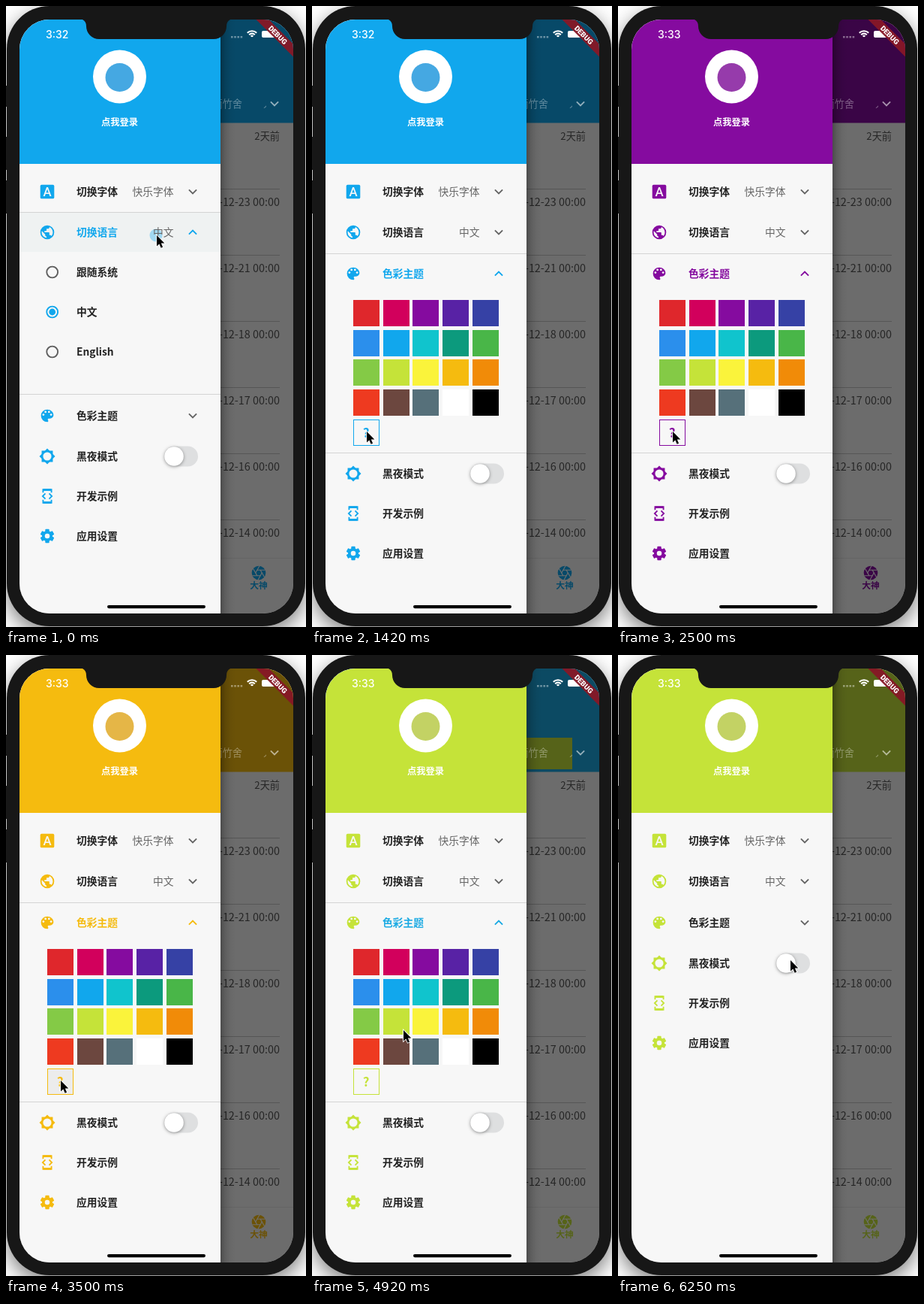
These frames come from a looping animation (400 by 826 pixels, 6.33 s). An HTML page with a canvas:

```html
<!DOCTYPE html>
<html lang="zh">
<head>
<meta charset="utf-8">
<style>
html, body { margin: 0; width: 100%; height: 100%; overflow: hidden; background: #fff; }
canvas { display: block; width: 400px; height: 826px; }
</style>
</head>
<body>
<canvas id="stage" width="400" height="826"></canvas>
<script>
const c = document.getElementById('stage').getContext('2d');
const LOOP = 6330, PAPER = '#f7f7f7';
const SANS = '"Noto Sans CJK SC","Noto Sans CJK",sans-serif';
const SWATCHES = ('df272c d2005c 850b9f 5822a5 3641a5 2b8fec 11a7ed 10c4cd 0c9a7d 49b648 ' +
  '84ca46 c5e339 faf33b f5bb0f f18b08 ee3a20 6c473f 56707a ffffff 000000').split(' ').map(s => '#' + s);

// [time, swatch index]
const THEMES = [[-999, 6], [1600, 8], [2150, 2], [2650, 9], [3150, 13], [3570, 4], [4160, 6], [4910, 11]];
// [time, x, y]
const POINTER = [[0, 201, 305], [300, 201, 305], [700, 205, 357], [1010, 205, 357], [1370, 73, 566],
  [4300, 73, 566], [4780, 122, 499], [5000, 122, 499], [5420, 215, 357], [5700, 215, 357], [6150, 230, 406], [LOOP, 230, 406]];

const clamp = v => Math.max(0, Math.min(1, v));
const ramp = (t, from, to) => clamp((t - from) / (to - from));
const smooth = k => k * k * (3 - 2 * k);
const rgb = hex => [1, 3, 5].map(i => parseInt(hex.substr(i, 2), 16));
function mix(a, b, k) {
  const p = rgb(a), q = rgb(b);
  return '#' + p.map((v, i) => Math.round(v + (q[i] - v) * k).toString(16).padStart(2, '0')).join('');
}

function rect(x, y, w, h, fill, r = 0) {
  c.fillStyle = fill;
  c.beginPath();
  c.roundRect(x, y, w, h, r);
  c.fill();
}
function disc(x, y, r, fill) {
  c.fillStyle = fill;
  c.beginPath();
  c.arc(x, y, r, 0, 7);
  c.fill();
}
function line(points, color, width) {
  c.strokeStyle = color;
  c.lineWidth = width;
  c.beginPath();
  points.forEach(p => c.lineTo(...p));
  c.stroke();
}
// y is the middle of the glyphs
function text(s, x, y, size, color, { align = 'left', weight = 400, font = SANS } = {}) {
  c.font = `${weight} ${size}px ${font}`;
  c.textAlign = align;
  c.fillStyle = color;
  c.fillText(s, x, y + size * .37);
}
function at(x, y, draw, scale = 1, angle = 0) {
  c.save();
  c.translate(x, y);
  c.rotate(angle);
  c.scale(scale, scale);
  draw();
  c.restore();
}
function clipped(x, y, w, h, draw) {
  c.save();
  c.beginPath();
  c.rect(x, y, w, h);
  c.clip();
  draw();
  c.restore();
}

const globe = new Path2D('M12 2a10 10 0 1 0 0 20a10 10 0 1 0 0-20zm-1 17.93c-3.95-.49-7-3.85-7-7.93 0-.62.08-1.21.21-1.79L9 15v1c0 1.1.9 2 2 2zm6.9-2.54c-.26-.81-1-1.39-1.9-1.39h-1v-3c0-.55-.45-1-1-1H8v-2h2c.55 0 1-.45 1-1V7h2c1.1 0 2-.9 2-2v-.41c2.93 1.19 5 4.06 5 7.41 0 2.08-.8 3.97-2.1 5.39z');
const paletteShape = new Path2D('M12 3a9 9 0 0 0 0 18c.83 0 1.5-.67 1.5-1.5 0-.39-.15-.74-.39-1.01-.23-.26-.38-.61-.38-.99 0-.83.67-1.5 1.5-1.5H16c2.76 0 5-2.24 5-5 0-4.42-4.03-8-9-8z');

// Icons are centred on 0,0 in a 24-unit box
const icons = {
  font(col) {
    rect(-10, -10, 20, 20, col, 2);
    text('A', 0, 0, 18, PAPER, { align: 'center', weight: 500, font: 'Roboto,sans-serif' });
  },
  globe(col) {
    c.translate(-12, -12);
    c.fillStyle = col;
    c.fill(globe, 'evenodd');
  },
  palette(col) {
    c.translate(-12, -12);
    c.fillStyle = col;
    c.fill(paletteShape);
    [[6.5, 10.5], [9.5, 6.5], [14.5, 6.5], [17.5, 10.5]].forEach(p => disc(...p, 1.5, PAPER));
  },
  sun(col) {
    rect(-8, -8, 16, 16, col);
    at(0, 0, () => rect(-8, -8, 16, 16, col), 1, Math.PI / 4);
    disc(0, 0, 6, PAPER);
  },
  code(col) {
    for (const s of [-1, 1]) {
      line([[-6, s * 5], [-6, s * 9.5], [6, s * 9.5], [6, s * 5]], col, 2);
      line([[s * 2.7, -3.9], [s * 6.6, 0], [s * 2.7, 3.9]], col, 2);
      rect(-6, s * 9 - 1.5, 12, 3, col, 1);
    }
  },
  gear(col) {
    for (let i = 0; i < 6; i++) at(0, 0, () => rect(-2.9, -10, 5.8, 8, col, 1), 1, i * Math.PI / 3);
    disc(0, 0, 7.6, col);
    disc(0, 0, 3.5, PAPER);
  },
  aperture(col) {
    disc(0, 0, 10, col);
    for (let i = 0; i < 6; i++) at(0, 0, () => line([[-2.5, -4], [9.4, -4]], '#fff', 1.1), 1, i * Math.PI / 3);
  }
};
const icon = (name, x, y, col, scale = .93) => at(x, y, () => icons[name](col), scale);
const chevron = (x, y, turn, col) =>
  at(x, y, () => line([[-5.1, -2.6], [0, 2.5], [5.1, -2.6]], col, 1.9), 1, Math.PI * turn);

function item(name, y, label, col, titleColor = '#222222') {
  icon(name, 55, y, col);
  text(label, 94, y, 13.75, titleColor, { weight: 700 });
}

// Expandable row; its content is revealed from the middle
function tile(name, y, label, value, open, full, th, content) {
  const h = full * open;
  item(name, y, label, th.now, mix('#222222', th.lag, open));
  if (value) text(value, 223.5, y, 13.75, '#666', { align: 'right' });
  chevron(249, y, open, mix('#666666', th.lag, open));
  if (!open) return;
  clipped(18, y + 27, 268, h, () => at(0, y - (full - h) / 2, content));
  c.globalAlpha = open;
  rect(18, y - 27, 268, 1, '#d4d4d4');
  rect(18, y + 27 + Math.round(h) - 1, 268, 1, '#d4d4d4');
  c.globalAlpha = 1;
}

// Touch splash on a full-width row
function splash(t, start, x, y, col) {
  const k = ramp(t, start, start + 380);
  if (t < start || k >= 1) return;
  clipped(18, y - 26, 268, 52, () => {
    c.globalAlpha = 1 - k;
    rect(18, y - 26, 268, 52, '#eff2f2');
    c.globalAlpha = .35 * (1 - k);
    disc(x, y + 4, 8 + 190 * k, col);
    c.globalAlpha = 1;
  });
}

function languages(col) {
  ['跟随系统', '中文', 'English'].forEach((s, i) => {
    const y = 53 + i * 53, on = i === 1;
    c.strokeStyle = on ? col : '#5f5f5f';
    c.lineWidth = 1.9;
    c.beginPath();
    c.arc(61.7, y, 7.4, 0, 7);
    c.stroke();
    if (on) disc(61.7, y, 4.4, col);
    text(s, 94, y, 13.75, '#222', { weight: 700 });
  });
}

function swatches(t, col) {
  const slot = n => Math.round(n * 39.7);
  SWATCHES.forEach((s, i) => rect(55 + slot(i % 5), 35 + slot(Math.floor(i / 5)), 35, 35, s));
  if (THEMES.some(([at], i) => i < 7 && t >= at - 100 && t < at)) rect(55, 194, 35, 35, '#ececec');
  c.strokeStyle = col;
  c.lineWidth = 1;
  c.strokeRect(55.5, 194.5, 34, 34);
  text('?', 72, 211.5, 17, col, { align: 'center', weight: 700 });
}

function page(th) {
  rect(18, 18, 365, 790, PAPER);
  rect(18, 18, 365, 137.5, th.lag);
  rect(200, 110, 147, 42, th.now);
  text('2天前', 365, 173, 13.2, '#555', { align: 'right' });
  [23, 21, 18, 17, 16, 14].forEach((d, i) => {
    rect(200, 243 + i * 88, 165, 1, '#c4c4c4');
    text(`2020-12-${d} 00:00`, 365, 261 + i * 88, 14.4, '#555', { align: 'right' });
  });
  rect(200, 734, 183, 1, '#e6e6e6');
  icon('aperture', 337, 754, th.now);
  text('大神', 337, 770.5, 11.8, th.now, { align: 'center', weight: 700 });
  rect(18, 18, 365, 790, 'rgba(0,0,0,.56)');
  text('听雨竹舍', 315, 130, 13.2, 'rgba(255,255,255,.36)', { align: 'right' });
  clipped(340, 115, 7, 30, () => text('人间书屋', 343, 130, 13.2, 'rgba(255,255,255,.36)'));
  chevron(358, 130, 0, 'rgba(255,255,255,.55)');
  const shade = c.createLinearGradient(286, 0, 306, 0);
  [.3, .12, .04, 0].forEach((a, i) => shade.addColorStop(i / 3, `rgba(0,0,0,${a})`));
  rect(286, 18, 20, 790, shade);
}

function drawer(t, th) {
  const lang = 1 - smooth(ramp(t, 80, 310));
  const theme = smooth(ramp(t, 800, 1030)) - smooth(ramp(t, 5500, 5730));
  const y2 = 356 + 189 * lang, y3 = y2 + 54 + 212 * theme;

  rect(18, 18, 268, 790, PAPER);
  rect(18, 18, 268, 192, th.now);
  disc(151.5, 94, 35.5, '#fff');
  disc(151.5, 95, 19, mix(th.now, '#beaac8', .3));
  text('点我登录', 151.5, 154, 12.3, '#fff', { align: 'center', weight: 700 });

  splash(t, 0, 200, 301, th.now);
  splash(t, 770, 205, 356, th.now);
  splash(t, 5470, 215, 356, th.now);

  tile('font', 247, '切换字体', '快乐字体', 0, 0, th);
  tile('globe', 301, '切换语言', '中文', lang, 189, th, () => languages(th.now));
  tile('palette', y2, '色彩主题', '', theme, 212, th, () => swatches(t, th.now));
  item('sun', y3, '黑夜模式', th.now);
  item('code', y3 + 53, '开发示例', th.now);
  item('gear', y3 + 106, '应用设置', th.now);

  rect(211, y3 - 13.5, 45, 27, '#dedfe0', 13.5);
  c.save();
  c.shadowColor = 'rgba(0,0,0,.4)';
  c.shadowBlur = 4;
  c.shadowOffsetY = 1;
  disc(224, y3, 12.8, '#fff');
  c.restore();
}

function statusBar(t) {
  text(t < 2000 ? '3:32' : '3:33', 53, 38, 14, '#fff', { weight: 500, font: 'Inter,sans-serif' });
  for (let i = 0; i < 4; i++) rect(300 + i * 4.2, 40, 2.6, 2.4, 'rgba(255,255,255,.4)');
  c.strokeStyle = '#fff';
  c.lineWidth = 2.1;
  for (const r of [2, 5.4, 8.8]) {
    c.beginPath();
    c.arc(328, 42, r, -Math.PI * .75, -Math.PI * .25);
    c.stroke();
  }
  rect(341, 33, 18, 9, '#fff', 2);
  at(362.5, 38.5, () => {
    rect(-40, -6, 80, 12, 'rgba(135,24,38,.95)');
    text('DEBUG', 0, 0, 9.6, '#fff', { align: 'center', weight: 800, font: 'Roboto,sans-serif' });
  }, 1, Math.PI / 4);
}

function phone() {
  rect(0, 0, 400, 826, '#fff');
  [[106, 28], [174, 44], [232, 44]].forEach(([y, h]) => rect(0, y, 3, h, '#222'));
  c.save();
  c.shadowColor = 'rgba(0,0,0,.5)';
  c.shadowBlur = 26;
  c.shadowOffsetY = 9;
  rect(1, 0, 398, 825, '#171717', 57);
  c.restore();
}

function notch() {
  c.fillStyle = '#171717';
  c.beginPath();
  c.moveTo(98, 17);
  c.quadraticCurveTo(107, 18, 107, 27);
  c.arcTo(107, 44, 126, 44, 17);
  c.arcTo(294, 44, 294, 27, 17);
  c.lineTo(294, 27);
  c.quadraticCurveTo(294, 18, 303, 17);
  c.fill();
}

function pointer(t) {
  const i = POINTER.findIndex(p => p[0] > t), [t0, x0, y0] = POINTER[i - 1], [t1, x1, y1] = POINTER[i];
  const k = smooth(ramp(t, t0, t1));
  at(x0 + (x1 - x0) * k, y0 + (y1 - y0) * k, () => {
    const arrow = new Path2D('M0 0V15.5L3.6 12.2L6 17.8L8.6 16.7L6.2 11.2H11Z');
    c.strokeStyle = '#fff';
    c.lineWidth = 1.8;
    c.stroke(arrow);
    c.fillStyle = '#000';
    c.fill(arrow);
  }, .94);
}

function themeAt(t) {
  const i = THEMES.filter(e => e[0] <= t).length - 1;
  const [start, n] = THEMES[i], before = THEMES[Math.max(0, i - 1)][1];
  return { now: SWATCHES[n], lag: mix(SWATCHES[before], SWATCHES[n], ramp(t, start, start + 200)) };
}

function frame() {
  const t = performance.now() % LOOP, th = themeAt(t);
  phone();
  c.save();
  c.beginPath();
  c.roundRect(18, 18, 365, 790, 40);
  c.clip();
  page(th);
  drawer(t, th);
  statusBar(t);
  notch();
  rect(135, 797, 131, 4.2, '#000', 2.1);
  c.restore();
  pointer(t);
  requestAnimationFrame(frame);
}
frame();
</script>
</body>
</html>
```
